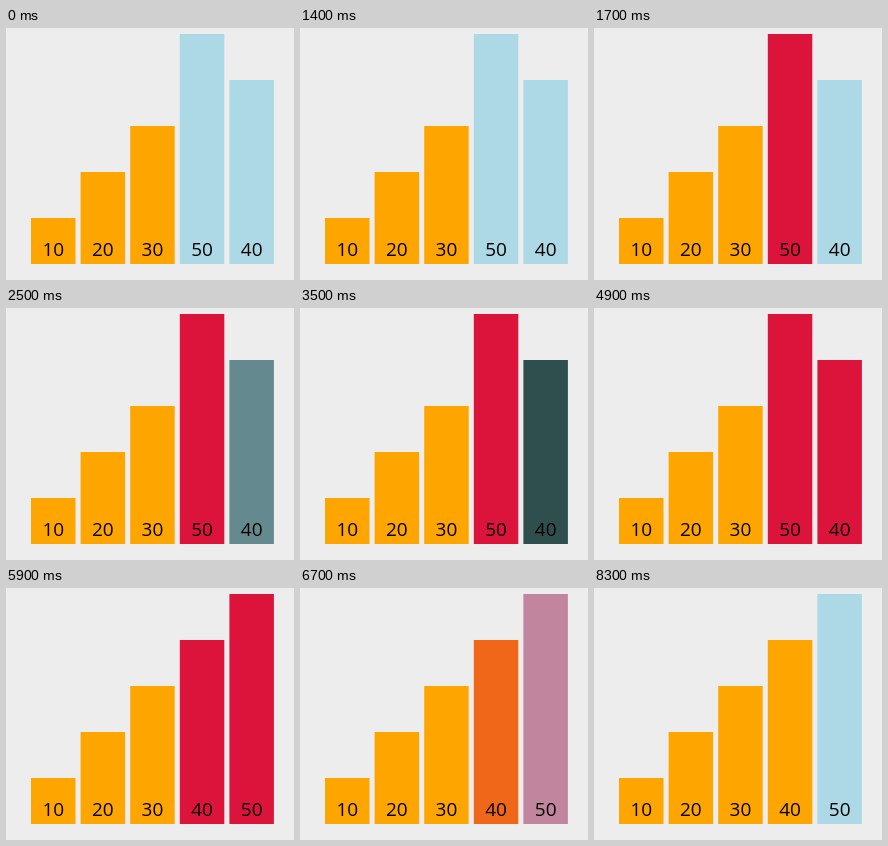
Write an HTML page that moves like this. It is 288 px wide and 252 px high and loops after 8600 ms.

```html
<!DOCTYPE html>
<html lang="en">
<head>
<meta charset="utf-8">
<title>Selection sort</title>
<style>
  html, body { margin: 0; width: 100%; height: 100%; overflow: hidden; background: #ededed; }
  svg { display: block; width: 288px; height: 252px; }
  text { font: 19px "Open Sans", "Noto Sans", sans-serif; text-anchor: middle; }
</style>
</head>
<body>
<svg viewBox="0 0 288 252"></svg>
<script>
const LOOP = 8600, TICK = 100, FADE = 300;
const BASE = 236, LEFT = 25, PITCH = 49.6, WIDTH = 44.5, UNIT = 4.6;
const IDLE = [173, 216, 230], MIN = [220, 20, 60], SCAN = [47, 79, 79], DONE = [255, 165, 0];

// Each step: start time, then the new state of some bars.
const steps = [
  [1400, { 3: { color: MIN } }],
  [2400, { 4: { color: SCAN } }],
  [3500, { 3: { color: IDLE }, 4: { color: MIN } }],
  [4600, { 3: { color: MIN } }],
  [5600, { 3: { value: 40 }, 4: { value: 50 } }],
  [6600, { 3: { color: DONE }, 4: { color: IDLE } }]
];

const svg = document.querySelector("svg");
function add(tag, attrs) {
  const el = document.createElementNS("http://www.w3.org/2000/svg", tag);
  for (const key in attrs) el.setAttribute(key, attrs[key]);
  return svg.appendChild(el);
}

const bars = [10, 20, 30, 50, 40].map((value, i) => {
  const x = LEFT + i * PITCH;
  return {
    start: { value, color: i < 3 ? DONE : IDLE },
    rect: add("rect", { x, width: WIDTH }),
    label: add("text", { x: x + WIDTH / 2, y: 228 })
  };
});

const mix = (a, b, p) => a + (b - a) * p;

// The CSS "ease" curve, cubic-bezier(.25, .1, .25, 1).
function ease(x) {
  if (x <= 0) return 0;
  if (x >= 1) return 1;
  const curve = (a, b, s) => 3 * a * s * (1 - s) ** 2 + 3 * b * s * s * (1 - s) + s ** 3;
  let lo = 0, hi = 1;
  for (let i = 0; i < 20; i++) {
    const mid = (lo + hi) / 2;
    if (curve(.25, .25, mid) < x) lo = mid; else hi = mid;
  }
  return curve(.1, 1, lo);
}

function draw(now) {
  const t = Math.floor(now % LOOP / TICK) * TICK;
  bars.forEach(({ start, rect, label }, i) => {
    let { value, color } = start, shown = value;
    for (const [time, changes] of steps) {
      const next = changes[i];
      if (!next || t < time) continue;
      const p = ease((t - time) / FADE);
      if (next.color) color = color.map((c, k) => mix(c, next.color[k], p));
      if (next.value) {
        value = mix(value, next.value, p);
        shown = next.value;
      }
    }
    rect.setAttribute("y", BASE - value * UNIT);
    rect.setAttribute("height", value * UNIT);
    rect.setAttribute("fill", `rgb(${color.map(Math.round)})`);
    label.textContent = shown;
  });
}

const origin = performance.now();
function frame() {
  draw(performance.now() - origin);
  requestAnimationFrame(frame);
}
frame();
</script>
</body>
</html>
```
